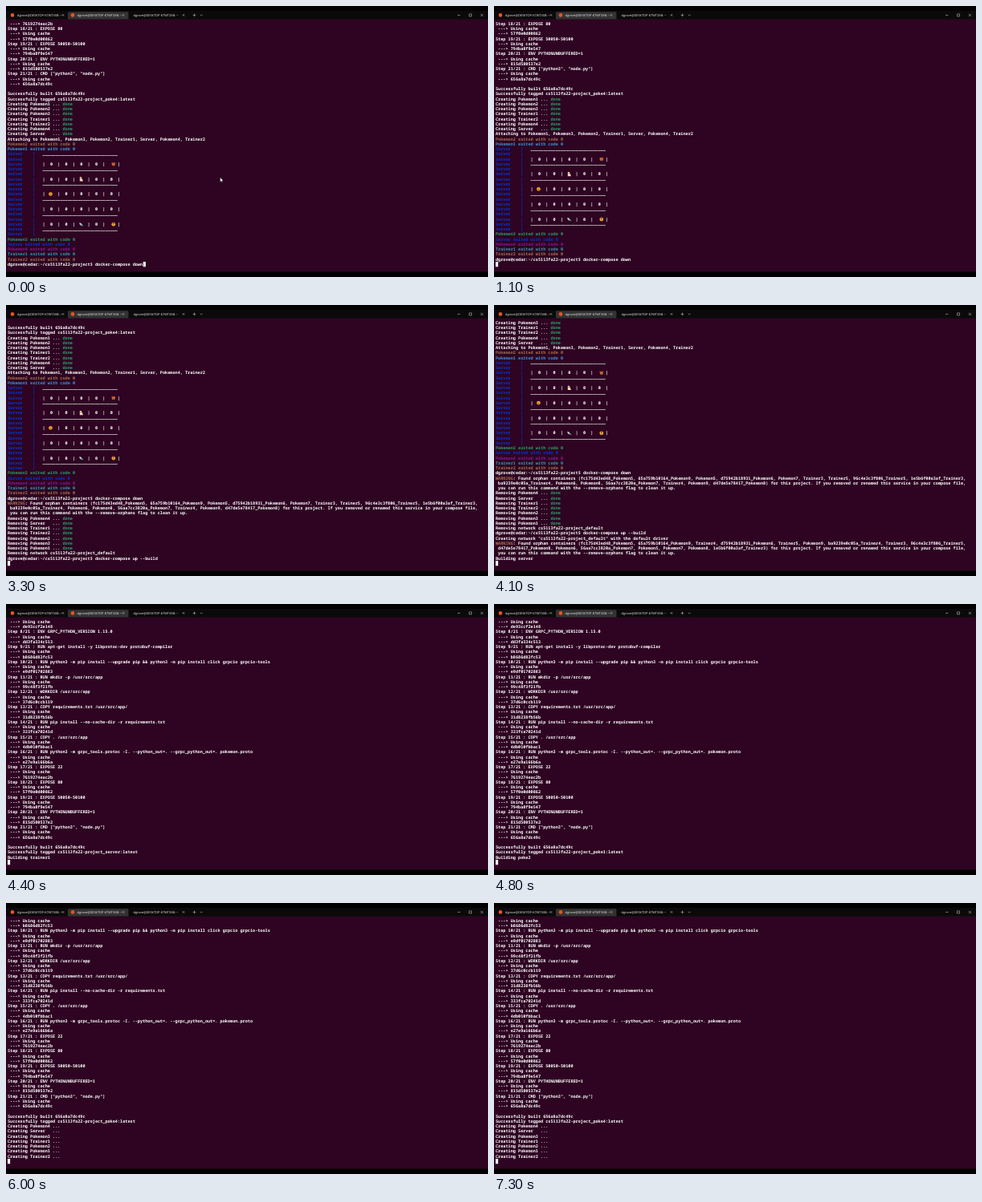
Write an HTML page that moves like this. It is 600x338 px and loops after 8000 ms.

```html
<!DOCTYPE html>
<html lang="en">
<head>
<meta charset="utf-8">
<title>Terminal session</title>
<style>
html, body { margin: 0; width: 100%; height: 100%; overflow: hidden; background: #000; }
svg { display: block; width: 100vw; height: 100vh; }
text { white-space: pre; text-rendering: geometricPrecision; }
#screen text { font: 600 5.208px "Noto Sans Mono", monospace; fill: #fff; }
#bar text { font: 3.9px "Open Sans", sans-serif; fill: #eee; }
</style>
</head>
<body>
<svg viewBox="0 0 600 338">
  <rect y="6.5" width="600" height="325" fill="#2e0422"/>
  <g id="bar"></g>
  <g id="screen"></g>
  <rect id="cursor" width="3.125" height="6.25" fill="#fff"/>
  <path id="mouse" d="M266.6 213.8v5.6l1.3-1.1.9 1.8.8-.4-.9-1.7h1.7z" fill="#fff" stroke="#000" stroke-width=".3"/>
</svg>
<script>
const LOOP = 8000, COL = 3.125, ROW = 6.25, ROWS = 49, LEFT = 2, TOP = 19;
const BLUE = '#0037da', CYAN = '#3a96dd', TEAL = '#2c9fb3', GREEN = '#26a269',
      PURPLE = '#881798', YELLOW = '#a2734c', WHITE = '#fff';
const PROMPT = 'dgrove@cedar:~/cs5113fa22-project$ ';
const DOWN = 'docker-compose down', UP = 'docker-compose up --build';
const $ = id => document.getElementById(id);

// The log: each line appears at a time; a segment is [text, colour, time, dy].
const log = [];
const put = (at, ...segs) => log.push({ at, segs, art: '' });

const STEPS = [
  ['FROM ubuntu:20.04', 'a0ce5a295b63'],
  ['ENV DEBIAN_FRONTEND=noninteractive', '5c1e7d2b94f0'],
  ['RUN apt-get update', '8b70de41f3a6'],
  ['RUN apt-get install -y python3 python3-pip', '2f94c6b0e817'],
  ['RUN apt-get install -y build-essential', 'c31ad85e7f42'],
  ['RUN apt-get install -y git curl', '70be19f4d3c5'],
  ['RUN apt-get install -y emacs nmap iputils-ping ssh netcat htop slurm net-tools', 'de93ccf2e148'],
  ['ENV GRPC_PYTHON_VERSION 1.15.0', 'dd3fa334c513'],
  ['RUN apt-get install -y libprotoc-dev protobuf-compiler', 'b8686d82fc53'],
  ['RUN python3 -m pip install --upgrade pip && python3 -m pip install click grpcio grpcio-tools', 'e9df01702883'],
  ['RUN mkdir -p /usr/src/app', '99c48f3f21fb'],
  ['WORKDIR /usr/src/app', '37d6c0ccb119'],
  ['COPY requirements.txt /usr/src/app/', '31d8238fb56b'],
  ['RUN pip install --no-cache-dir -r requirements.txt', '333fca70241d'],
  ['COPY . /usr/src/app', '4db010fbbac1'],
  ['RUN python3 -m grpc_tools.protoc -I. --python_out=. --grpc_python_out=. pokemon.proto', 'e27e9a166b6a'],
  ['EXPOSE 22', '7619274eac2b'],
  ['EXPOSE 80', '57f0e0d00862'],
  ['EXPOSE 50050-50100', '794ba8f9e547'],
  ['ENV PYTHONUNBUFFERED=1', '815d580537e2'],
  ['CMD ["python3", "node.py"]', '656a8a7dc49c']
];

function build(service, start, end) {
  put(start, 'Building ' + service);
  STEPS.forEach(([cmd, hash], i) => {
    put(end, `Step ${i + 1}/21 : ${cmd}`);
    if (i) put(end, ' ---> Using cache');
    put(end, ' ---> ' + hash);
  });
  put(end, '');
  put(end, 'Successfully built 656a8a7dc49c');
  put(end, `Successfully tagged cs5113fa22-project_${service}:latest`);
}

function each(verb, names, at, doneAt) {
  for (const name of names.split(' '))
    put(at, `${verb} ${name.padEnd(8)} ... `, ['done', GREEN, doneAt]);
}

function warn(at, first, rest) {
  put(at, ['WARNING', YELLOW], ': Found orphan containers (' + first);
  put(at, ` ${rest}) for this project. If you removed or renamed this service in your compose file,`);
  put(at, ' you can run this command with the --remove-orphans flag to clean it up.');
}

const exited = (name, color) => put(0, [name + ' exited with code 0', color]);

// Small board figures, centred on 0,0.
const dot = (x, y, r, fill) => `<circle cx="${x}" cy="${y}" r="${r}" fill="${fill}"/>`;
const FIGURES = {
  red: dot(0, .3, 2, '#d9803a') + dot(-1.6, -1.1, .9, '#b5482c') + dot(1.6, -1.1, .9, '#b5482c') + dot(0, 1, .8, '#6e2a20'),
  pale: `<path d="M-1.8-2.6h2L2.4 2.6h-4.2z" fill="#efdccb"/>` + dot(-.4, -.9, .9, '#d98b45'),
  gold: dot(0, 0, 2.4, '#eda52c') + dot(.2, .6, .9, '#a8601c'),
  mouse: `<path d="M-2.7-2 0-.8 2.7 2.3-1.6 1.5z" fill="#87a7a8"/>` + dot(-1.3, -.5, .9, '#d5dedc'),
  face: dot(0, .2, 2.4, '#f0b23a') + dot(0, -1.4, 1.2, '#8f5322') + dot(0, 1, .7, '#7a3f1a')
};

function board() {
  const figures = [[0, 4, 'red', 133.8], [1, 2, 'pale', 93.6], [2, 0, 'gold', 55.5], [4, 2, 'mouse', 93.8], [4, 4, 'face', 133.8]];
  const edge = ['   ' + '_'.repeat(30), WHITE, 0, -.5];
  const tag = ['Server    |', BLUE];
  for (let r = 0; r < 5; r++) {
    const here = figures.filter(f => f[0] === r);
    const cells = [0, 1, 2, 3, 4].map(c => here.some(f => f[1] === c) ? '     ' : '  0  ');
    put(0, tag, edge);
    put(0, tag);
    put(0, tag, `   |${cells.join('|')}|`);
    log[log.length - 1].art = here.map(f => `<g transform="translate(${f[3]} 3.1)">${FIGURES[f[2]]}</g>`).join('');
  }
  put(0, tag, edge);
  put(0, tag);
}

build('poke4', 0, 0);
each('Creating', 'Pokemon1 Pokemon2 Pokemon3 Trainer1 Trainer2 Pokemon4 Server', 0, 0);
put(0, 'Attaching to Pokemon1, Pokemon3, Pokemon2, Trainer1, Server, Pokemon4, Trainer2');
exited('Pokemon2', YELLOW);
exited('Pokemon1', CYAN);
board();
exited('Pokemon3', GREEN);
exited('Server', BLUE);
exited('Pokemon4', PURPLE);
exited('Trainer1', TEAL);
exited('Trainer2', YELLOW);

put(600, PROMPT + DOWN);
warn(1300,
  'fc175d43ed48_Pokemon5, 65a759b10164_Pokemon9, Pokemon5, d75942b18931_Pokemon6, Pokemon7, Trainer3, Trainer5, 96c4e3c3f806_Trainer5, 1e5b6f00a3af_Trainer3,',
  'ba9239e0c05a_Trainer4, Pokemon6, Pokemon8, 56aa7cc3820a_Pokemon7, Trainer4, Pokemon9, d47de5e78417_Pokemon8');
each('Removing', 'Pokemon4 Server Trainer1 Trainer2 Pokemon2 Pokemon3 Pokemon1', 1300, 1400);
put(1500, 'Removing network cs5113fa22-project_default');

put(3200, PROMPT + UP);
put(3900, 'Creating network "cs5113fa22-project_default" with the default driver');
warn(4000,
  'fc175d43ed48_Pokemon5, 65a759b10164_Pokemon9, Trainer4, d75942b18931_Pokemon6, Trainer5, Pokemon9, ba9239e0c05a_Trainer4, Trainer3, 96c4e3c3f806_Trainer5,',
  'd47de5e78417_Pokemon8, Pokemon6, 56aa7cc3820a_Pokemon7, Pokemon5, Pokemon7, Pokemon8, 1e5b6f00a3af_Trainer3');

let start = 4100;
for (const [service, end] of [['server', 4300], ['trainer1', 4500], ['trainer2', 4600],
  ['poke1', 4800], ['poke2', 4900], ['poke3', 5100], ['poke4', 5300]]) {
  build(service, start, end);
  start = end;
}
each('Creating', 'Pokemon4 Server Pokemon3 Trainer1 Pokemon2 Pokemon1 Trainer2', 5400, LOOP);

// Text on the line being edited.
function input(t) {
  if (t < 600) return PROMPT + DOWN;
  if (t < 1800 || t >= 3200) return '';
  return PROMPT + (t < 2300 ? '' : t < 2500 ? DOWN : UP);
}

const escape = s => s.replace(/&/g, '&amp;').replace(/</g, '&lt;');

function span(seg, t) {
  const [text, color = WHITE, at = 0, dy = 0] = [].concat(seg);
  return at > t ? '' : `<tspan fill="${color}" dy="${dy}">${escape(text)}</tspan>`;
}

function row(line, i, t) {
  const text = line.segs.map(s => span(s, t)).join('');
  return `<g transform="translate(0 ${TOP + i * ROW})"><text x="${LEFT}" y="4.9">${text}</text>${line.art}</g>`;
}

function drawBar() {
  const title = 'dgrove@DESKTOP-K7WT3XB: ~';
  const mid = 11.4;
  const cross = (x, r) => `<path d="M${x - r} ${mid - r}l${2 * r} ${2 * r}m0 ${-2 * r}l${-2 * r} ${2 * r}"/>`;
  const tab = (x, close) => `<text x="${x}" y="12.7" stroke="none">${title}</text>${cross(close, 1.2)}`;
  $('bar').innerHTML =
    `<rect y="6.5" width="600" height="10" fill="#0a0a0a"/>
     <path d="M77 16.5V8.4q0-1.2 1.2-1.2h73q1.2 0 1.2 1.2v8.1z" fill="#333"/>
     ${dot(8, mid, 2.3, '#e95420')}${dot(83, mid, 2.3, '#e95420')}
     <g fill="none" stroke="#ddd" stroke-width=".5">
     ${tab(14, 71)}${tab(88.5, 146)}${tab(158.5, 221)}${cross(592.4, 1.6)}
     <path d="M232.6 ${mid}h3.8m-1.9-1.9v3.8M241.8 10.7l1.4 1.4 1.4-1.4M562 ${mid}h3.4M576.6 9.9h3v3h-3z"/></g>`;
}

let shown = '';
function draw(t) {
  const typed = input(t);
  const lines = log.filter(l => l.at <= t).concat({ segs: [typed], art: '' }).slice(-ROWS);
  const markup = lines.map((l, i) => row(l, i, t)).join('');
  if (markup === shown) return;
  shown = markup;
  $('screen').innerHTML = markup;
  $('cursor').setAttribute('x', LEFT + typed.length * COL);
  $('cursor').setAttribute('y', TOP + (lines.length - 1) * ROW);
  $('mouse').setAttribute('visibility', t < 600 ? 'visible' : 'hidden');
}

drawBar();
const begin = performance.now();
function tick() {
  draw((performance.now() - begin) % LOOP);
  requestAnimationFrame(tick);
}
tick();
</script>
</body>
</html>
```
